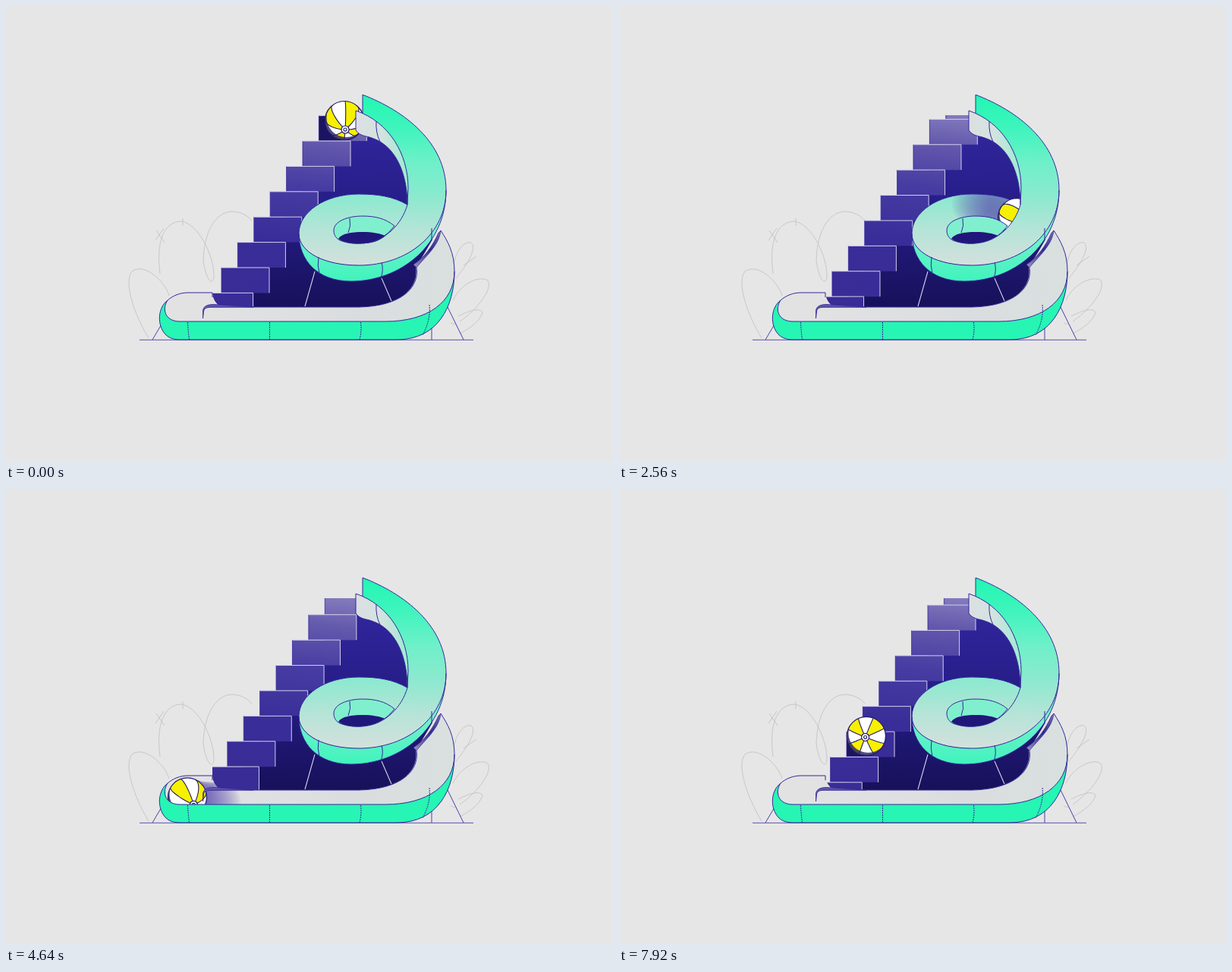
An HTML page with a canvas that plays this animation: 800x600 px, repeating every 8 s.

```html
<!DOCTYPE html>
<html lang="en">
<head>
<meta charset="utf-8">
<title>Ball slide</title>
<style>
html, body { margin: 0; width: 100%; height: 100%; overflow: hidden; background: #e6e6e6; }
canvas { display: block; width: 800px; height: 600px; }
</style>
</head>
<body>
<canvas id="stage"></canvas>
<script>
const canvas = document.getElementById('stage');
const ctx = canvas.getContext('2d');
const dpr = window.devicePixelRatio || 1;
canvas.width = 800 * dpr;
canvas.height = 600 * dpr;
ctx.scale(dpr, dpr);

const LOOP = 8000, TICK = 80, R = 25.5;
const INK = '#34279a', PALE = '#d3cfee', GREEN = '#27f5b3';
const P = d => new Path2D(d);

function ramp(x0, y0, x1, y1, stops) {
  const g = ctx.createLinearGradient(x0, y0, x1, y1);
  stops.forEach(([o, c]) => g.addColorStop(o, c));
  return g;
}
function line(path, color = INK, width = 1, dash = []) {
  ctx.strokeStyle = color;
  ctx.lineWidth = width;
  ctx.setLineDash(dash);
  ctx.stroke(path);
  ctx.setLineDash([]);
}
function fill(path, color) {
  ctx.fillStyle = color;
  ctx.fill(path);
}
function clipped(path, fn) {
  ctx.save();
  ctx.clip(path);
  fn();
  ctx.restore();
}

const shape = {
  scribble: P(`M188 438C168 405 155 364 166 350C182 338 209 362 215 382
    M203 353C196 300 215 283 232 284C254 288 275 330 274 358C271 372 262 355 260 335C261 300 275 272 297 271C309 271 318 276 324 283
    M198 296L209 312M197 309L208 293M233 280V290
    M589 348C592 320 605 310 613 312C622 319 606 344 592 360
    M589 388C600 365 625 355 635 362C643 375 615 405 598 416
    M596 409C610 402 624 397 628 404C625 415 612 425 598 432
    M603 342L620 330M586 418L592 420`),
  ground: P('M176 440.3H616'),
  legs: P('M206 418L193 440M582 397L603 440M561 425V440'),
  dark: P('M454 146L476 160L530 200L540 290L562 308L541 344L543 378C530 396 500 397 470 397H293Z'),
  struts: P('M407 350L394 396M495 359L508 389'),
  stepArea: P('M272 144H520V397H284C277 394 272 386 272 378Z'),
  floor: P('M272 378H240C229 378 220 382 213 388C206 398 208 415 228 416H500C556 416 591 390 591 350C591 325 582 310 573 296L540 343C545 372 520 396 465 397H284C277 394 272 386 272 378Z'),
  floorLine: P('M272 384V378H240C229 378 220 382 213 388M573 296C582 310 591 325 591 350M541 345C545 372 520 396 465 397H266'),
  rim: P('M259.500 412V402C260 396 265 393.500 274 393.500L326 397H272C264 397 261 399 260.500 403Z'),
  strip: P('M573 296C571 316 552 331 541 345L537 341C552 331 562 317 570 299Z'),
  wall: P('M213 388C200 398 200 418 207 429C212 437 219 440 230 440H515C570 440 591 395 591 350C591 390 556 416 500 416H228C208 415 206 398 213 388Z'),
  wallSeams: P('M239.500 417Q240 429 241.500 440M347.500 417V440M467.500 417Q469 429 466 440M558 394Q560 414 549 434'),
  ring: P('M529 262C510 251 490 248 465 248C420 248 386 272 386 300C386 325 420 342 465 342C500 342 520 335 540 318Z'),
  ringLine: P('M529 262C510 251 490 248 465 248C420 248 386 272 386 300'),
  band: P('M470 117C525 138 580 180 580 243C580 300 530 342 465 342L470 313C500 311 522 287 529 262C534 205 510 158 470 142Z'),
  bandLine: P('M470 142V117C525 138 580 180 580 243'),
  bandEdge: P('M529 262C522 287 500 311 470 313'),
  coil: P('M470 117C525 138 580 180 580 243C580 300 530 342 465 342C420 342 386 325 386 300C386 272 420 248 465 248C490 248 510 251 529 262C534 205 510 158 470 142Z'),
  hole: P('M512 290C500 280 486 277 470 277C450 277 432 284 432 296C432 303 436 307 440 309C450 313 462 314 470 313C488 312 502 303 512 290Z'),
  holeDark: P('M438 307C442 300 455 298 470 298C483 298 493 300 500 303C492 310 482 313 470 313C460 314 446 313 438 307Z'),
  holeSeam: P('M453 280Q455 290 451 299'),
  panel: P('M461 138C505 153 530 195 530 240L529 262C529 222 514 184 482 174C474 171 467 172 461 164Z'),
  panelSeam: P('M488 152Q487 167 493 179'),
  coilWall: P('M386 300C386 325 420 342 465 342C530 342 580 300 580 243C580 315 520 363 455 363C410 363 386 335 386 300Z'),
  coilSeams: P('M412 331Q410 342 413 353M495 338Q498 348 494 359M561 293V309'),
  pit: P('M0 0H800V397H260V600H0Z')
};

const coilFill = ramp(0, 117, 0, 342, [
  [0, '#20f8b2'], [.2, '#40f4bd'], [.4, '#6ff0c9'], [.6, '#8ce9cf'], [.8, '#b6e4d7'], [1, '#d4e0dd']
]);
const stepFill = ramp(460, 144, 435, 390, [
  [0, '#847cbd'], [.17, '#6258ac'], [.4, '#473ca2'], [.7, '#392d99'], [1, '#392c96']
]);
const darkFill = ramp(0, 170, 0, 397, [[0, '#30259a'], [.45, '#251c86'], [1, '#17115a']]);
const floorFill = ramp(260, 0, 591, 0, [[0, '#e2e2e3'], [.6, '#dadddf'], [1, '#d9e0de']]);
const coilWallFill = ramp(0, 300, 0, 363, [[0, '#74f0cf'], [1, '#40f4bc']]);
const stripFill = ramp(572, 296, 540, 343, [[0, '#7770ad'], [.5, '#31288e'], [1, '#8f8bb8']]);
const panelFill = ramp(461, 0, 530, 0, [[0, '#dcdfe2'], [.5, '#d2e3df'], [1, '#9cebd2']]);

// time, x, y of the ball centre
const route = [
  [0, 446, 151], [560, 457, 138], [900, 500, 148], [1080, 535, 180],
  [1230, 553, 225], [1340, 552, 262], [1470, 532, 299], [1600, 498, 324.5],
  [1760, 450, 326], [1900, 414, 306], [2020, 410, 282], [2160, 438, 264],
  [2340, 480, 263], [2560, 525, 279], [2700, 552, 302], [2840, 565, 338],
  [3000, 561, 370], [3200, 533, 398], [3400, 490, 410], [3840, 386, 412.5],
  [4400, 275, 412], [4600, 243, 408], [4800, 231, 398], [5000, 240, 387],
  [5280, 273.5, 381], [5520, 287, 380], [5700, 290.4, 379.7]
];
// time, hub offset in radii, turn in degrees
const spin = [
  [0, .04, .47, -65], [800, .45, .1, 20], [1600, .12, -.53, 110], [2560, .8, .4, 120],
  [3840, .7, .25, 79], [4700, .3, .4, -50], [5520, 0, 0, -160], [6800, -.08, 0, -150], [LOOP, -.05, .06, -135]
];

function span(keys, t) {
  let i = 0;
  while (i < keys.length - 2 && t >= keys[i + 1][0]) i++;
  return i;
}
function slope(i, c) {
  const a = route[Math.max(0, i - 1)], b = route[Math.min(route.length - 1, i + 1)];
  return (b[c] - a[c]) / (b[0] - a[0]);
}
function place(t) {
  if (t >= 5700) return [308 + (t - 6800) * .016, 353 - (t - 6800) * .02424];
  const i = span(route, t), a = route[i], b = route[i + 1];
  const d = b[0] - a[0], u = (t - a[0]) / d, w = u * u * (3 - 2 * u);
  return [1, 2].map(c => a[c] * (1 - w) + b[c] * w
    + d * u * (1 - u) * ((1 - u) * slope(i, c) - u * slope(i + 1, c)));
}
function pose(t) {
  const i = span(spin, t), a = spin[i], b = spin[i + 1], u = (t - a[0]) / (b[0] - a[0]);
  return [1, 2, 3].map(c => a[c] + (b[c] - a[c]) * u);
}
function disc(x, y, r) {
  const p = new Path2D();
  p.arc(x, y, r, 0, 7);
  return p;
}

// Projected points of one meridian, from the hub to the visible rim
function meridian(lon, dir, tilt) {
  const pts = [];
  for (let i = 0; i <= 32; i++) {
    const lat = Math.PI * i / 32, s = Math.sin(lat), z = Math.cos(lat);
    const c = s * Math.cos(lon - dir), q = s * Math.sin(lon - dir);
    const along = c * Math.cos(tilt) + z * Math.sin(tilt);
    const depth = z * Math.cos(tilt) - c * Math.sin(tilt);
    const x = along * Math.cos(dir) - q * Math.sin(dir);
    const y = along * Math.sin(dir) + q * Math.cos(dir);
    if (depth < 0) {
      const m = 1.5 / Math.hypot(x, y);
      pts.push([x * m * R, y * m * R]);
      break;
    }
    pts.push([x * R, y * R]);
  }
  return pts;
}
function trace(pts) {
  const p = new Path2D();
  pts.forEach(([x, y]) => p.lineTo(x, y));
  return p;
}

function ball(t) {
  const [x, y] = place(t), [hx, hy, turn] = pose(t);
  const dir = Math.atan2(hy, hx), tilt = Math.asin(Math.min(.95, Math.hypot(hx, hy)));
  const body = disc(0, 0, R);
  ctx.save();
  ctx.translate(x, y);
  fill(body, '#ffffff');
  clipped(body, () => {
    const edges = [...Array(8).keys()].map(i =>
      meridian((turn - 22.5 + i * 45) * Math.PI / 180, dir, tilt));
    for (let i = 0; i < 8; i += 2) {
      const p = trace([...edges[i], ...edges[i + 1].slice().reverse()]);
      p.closePath();
      fill(p, '#f7f000');
    }
    edges.forEach(e => line(trace(e), '#221a66', 1.1));
    const shade = new Path2D(body);
    shade.addPath(disc(2.5, -4, R + .5));
    ctx.fillStyle = 'rgba(38,28,105,.8)';
    ctx.fill(shade, 'evenodd');
    const hub = disc(hx * R, hy * R, 5);
    fill(hub, '#ffffff');
    line(hub, '#221a66', 1.2);
    line(disc(hx * R, hy * R, 2), '#221a66', 1.1);
  });
  line(body, '#221a66', 1.2);
  ctx.restore();
}

function trail(t, area) {
  if (t < 700 || t > 5300) return;
  clipped(area, () => {
    ctx.fillStyle = 'rgba(84,70,160,.06)';
    for (let k = 0; k < 25; k++) {
      const at = t - k * 12;
      if (at < 500) break;
      const [x, y] = place(at);
      ctx.beginPath();
      ctx.arc(x, y, R, 0, 7);
      ctx.fill();
    }
  });
}

function steps(t) {
  const rise = 33.4, run = 21.4, n = (t * .02424 / rise) % 1;
  const [bx, by] = place(t), riding = t < 700 || t > 5400;
  clipped(shape.stepArea, () => {
    for (let i = -2; i < 9; i++) {
      const x = 391 + (n - i) * run, y = 178 - (n - i) * rise;
      const box = new Path2D();
      box.rect(x, y, 63, rise);
      fill(box, stepFill);
      if (riding) clipped(box, () => {
        const cast = disc(bx, by + 1, R);
        cast.rect(bx - 50, by - R + 1, 50, 2 * R);
        fill(cast, '#1b1462');
      });
      line(P(`M${x} ${y}V${y + rise}`), INK, .8);
      line(P(`M${x} ${y}H${x + 63}V${y + rise}`), PALE, 1);
    }
  });
}

function lowerSlide(t) {
  fill(shape.floor, floorFill);
  if (t >= 2640) trail(t, shape.floor);
  fill(shape.strip, stripFill);
  line(shape.strip, INK, .7);
  line(shape.floorLine);
  if (t >= 4950) clipped(shape.pit, () => ball(t));
  else if (t >= 2640) ball(t);
  fill(shape.rim, '#6259a8');
  line(shape.rim, INK, .8);
  fill(shape.wall, GREEN);
  line(shape.wall);
  line(shape.wallSeams, INK, 1, [2, 1]);
}

function hole() {
  fill(shape.hole, '#80efce');
  fill(shape.holeDark, '#20177a');
  line(shape.hole);
  line(shape.holeSeam);
}
function band() {
  fill(shape.band, coilFill);
  line(shape.bandLine);
  line(shape.bandEdge);
}
function upperSlide(t) {
  fill(shape.ring, coilFill);
  line(shape.ringLine);
  if (t < 2000) {
    band();
    trail(t, shape.coil);
    hole();
    ball(t);
  } else {
    if (t < 2960) trail(t, shape.ring);
    if (t < 2640) ball(t);
    hole();
    band();
  }
  fill(shape.panel, panelFill);
  line(shape.panel);
  line(shape.panelSeam);
  fill(shape.coilWall, coilWallFill);
  line(shape.coilWall);
  line(shape.coilSeams);
}

function draw(t) {
  ctx.fillStyle = '#e6e6e6';
  ctx.fillRect(0, 0, 800, 600);
  line(shape.scribble, '#c3c3c5', .9);
  line(shape.ground, '#5a50b0');
  line(shape.legs, '#4a3fa8');
  fill(shape.dark, darkFill);
  line(shape.struts, PALE, 1.1);
  steps(t);
  lowerSlide(t);
  upperSlide(t);
}

let start, shown = -1;
function frame(now) {
  if (start === undefined) start = now;
  const t = Math.floor(Math.max(0, now - start) % LOOP / TICK) * TICK;
  if (t !== shown) draw(shown = t);
  requestAnimationFrame(frame);
}
draw(0);
requestAnimationFrame(frame);
</script>
</body>
</html>
```
